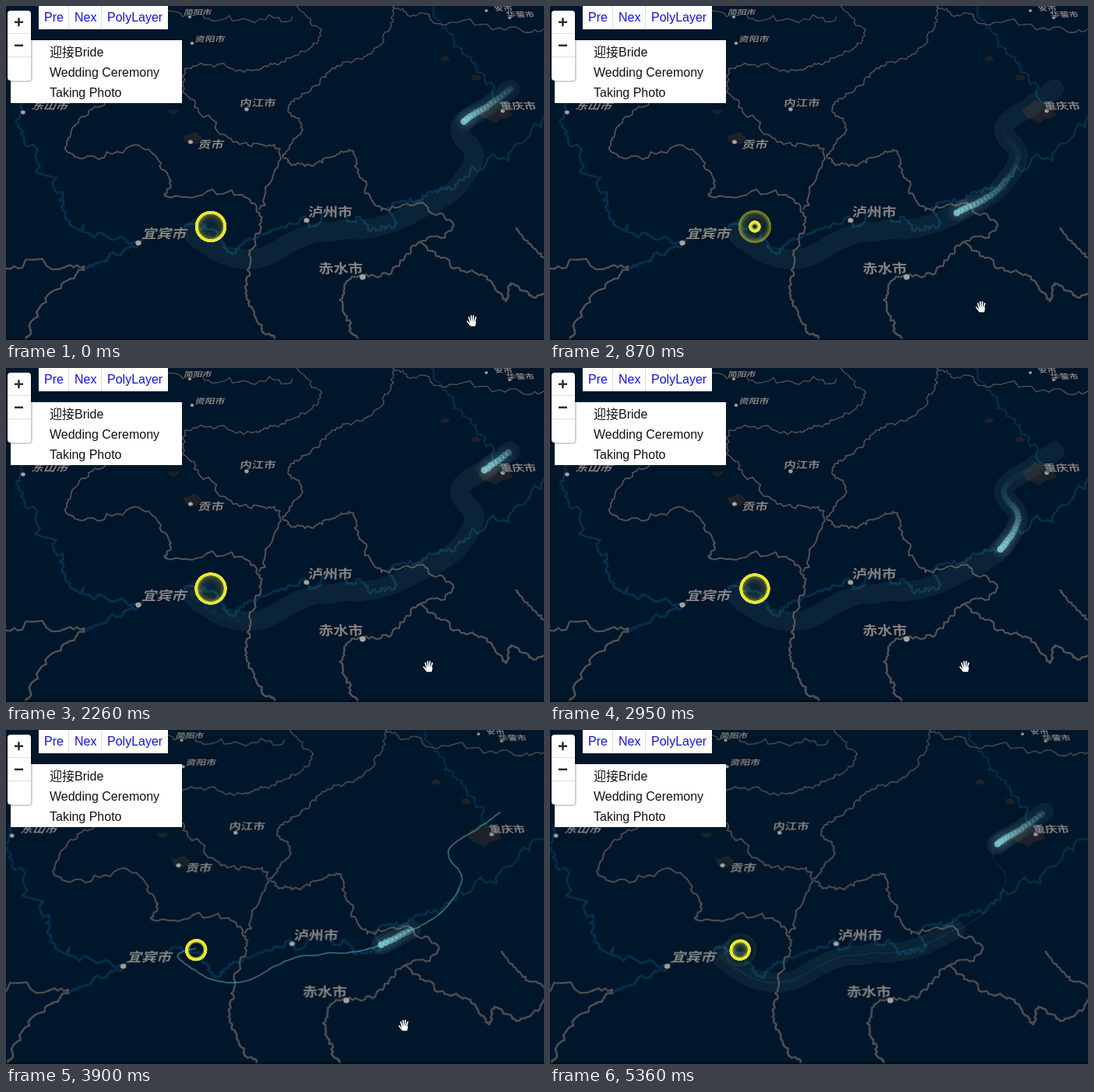
Write an HTML page with a canvas that moves like this. It is 691 px wide and 430 px high and loops after 5.43 s.

```html
<!DOCTYPE html>
<html lang="zh">
<head>
<meta charset="utf-8">
<title>Route map</title>
<style>
  html, body { margin: 0; width: 100%; height: 100%; overflow: hidden; background: #00162b; }
  canvas { display: block; }
</style>
</head>
<body>
<canvas id="stage" width="691" height="430"></canvas>
<script>
const W = 691, H = 430, LOOP = 5430;
const TRIP = 2410, RIPPLE = 745;
const DRAG_START = 3080, RESTART = 3720;
const SANS = '"Liberation Sans", Arial, "Noto Sans CJK SC", "Noto Sans CJK", sans-serif';
const CJK = '"Noto Sans CJK SC", "Noto Sans CJK", sans-serif';
const ctx = document.getElementById('stage').getContext('2d');

const clamp = (v, a, b) => Math.min(b, Math.max(a, v));
const mod = (v, n) => ((v % n) + n) % n;
const easeOut = u => 1 - (1 - clamp(u, 0, 1)) ** 2;
const parsePoints = text => text.split(' ').map(p => p.split(',').map(Number));

/* ---------- Lines ---------- */

let seed = 11;
const random = () => (seed = (seed * 16807) % 2147483647) / 2147483647 - 0.5;

// Catmull-Rom curve through the key points.
function curve(keys, steps) {
  const out = [keys[0]];
  for (let i = 1; i < keys.length; i++) {
    const b = keys[i - 1], c = keys[i], a = keys[i - 2] || b, d = keys[i + 1] || c;
    for (let n = 1; n <= steps; n++) {
      const u = n / steps;
      out.push([0, 1].map(k => b[k] + 0.5 * u * (c[k] - a[k]
        + u * (2 * a[k] - 5 * b[k] + 4 * c[k] - d[k] + u * (3 * (b[k] - c[k]) + d[k] - a[k])))));
    }
  }
  return out;
}

// Midpoint displacement turns a smooth curve into a natural border or river.
function roughen(list, amount, depth) {
  if (!depth) return list;
  const out = [list[0]];
  for (let i = 1; i < list.length; i++) {
    const [ax, ay] = list[i - 1], [bx, by] = list[i];
    const d = random() * amount;
    out.push([(ax + bx) / 2 + (by - ay) * d, (ay + by) / 2 - (bx - ax) * d], [bx, by]);
  }
  return roughen(out, amount, depth - 1);
}

/* ---------- Map ---------- */

const RIVERS = [
  '22,125 19,165 62,235 88,285 170,304',
  '170,305 130,325 100,340',
  '170,304 195,292 262,288 290,318 315,300 388,276 450,272 470,288 500,282 495,258 548,240 580,228 650,185 716,132',
  '545,0 575,45 605,80 640,135'
];

const BORDERS = [
  '497,0 495,25 470,60 425,77 385,112 363,132 380,157 357,196 395,206 440,185 457,222 482,263 528,254 575,283 528,306',
  '452,430 434,395 440,353 495,344 528,306 570,332 618,352 642,380 648,357 681,375 716,346',
  '716,334 678,312 655,286',
  '128,124 84,160 88,194 175,183 212,225 208,246 300,243 328,278 310,340 312,386 345,430',
  '372,0 404,38 345,74 310,82 230,80 242,130 300,178 352,184 325,262',
  '208,5 275,18 368,14',
  '497,0 545,17 660,30 716,28',
  '0,338 100,335 62,366 25,430'
];

const URBAN = [[630, 135, 26, 15], [240, 170, 14, 8], [215, 136, 7, 3.5], [564, 68, 6, 4], [603, 92, 7, 4]];

// name, dot x, dot y, label offset x, label offset y
const CITIES = [
  ['简阳市', 236, 14, -8, -3], ['资阳市', 239, 48, 3, -2], ['内江市', 309, 133, -9, -4],
  ['东山市', 22, 137, 10, -4], ['贡市', 237, 175, 9, 8], ['宜宾市', 170, 305, 4, -6],
  ['泸州市', 386, 276, 2, -5], ['赤水市', 458, 349, -56, -5], ['重庆市', 638, 135, -2, -2],
  ['安市', 617, 6, 11, 0], ['华蓥市', 647, 15, -3, -1]
];

function drawMap() {
  const canvas = document.createElement('canvas');
  canvas.width = W + 25;
  canvas.height = H + 5;
  const c = canvas.getContext('2d');
  c.fillStyle = '#00162b';
  c.fillRect(0, 0, canvas.width, canvas.height);
  c.lineCap = c.lineJoin = 'round';

  c.fillStyle = '#1d2229';
  for (const [x, y, rx, ry] of URBAN) {
    c.beginPath();
    for (let a = 0; a < 6.28; a += 0.4) {
      const size = 0.9 + random() * 0.5;
      c.lineTo(x + rx * size * Math.cos(a), y + ry * size * Math.sin(a));
    }
    c.fill();
  }

  const strokeLines = (lines, colour, amount, width) => {
    c.strokeStyle = colour;
    for (const text of lines) {
      const list = roughen(curve(parsePoints(text), 4), amount, 2);
      for (let i = 1; i < list.length; i++) {
        c.lineWidth = width(list[i][1]);
        c.beginPath();
        c.moveTo(...list[i - 1]);
        c.lineTo(...list[i]);
        c.stroke();
      }
    }
  };
  strokeLines(RIVERS, '#04304d', 1, y => 1.8 + y / 240);
  strokeLines(BORDERS, '#545253', 0.7, y => 1.2 + y / 330);

  for (const [name, x, y, dx, dy] of CITIES) {
    c.fillStyle = '#a5a29c';
    c.beginPath();
    c.ellipse(x, y, 2 + y / 180, 1.8 + y / 220, 0, 0, 7);
    c.fill();
    // Perspective leans and flattens the lettering.
    c.save();
    c.transform(1, 0, (x - 400) * 0.0011, 0.72 + y * 0.0005, x + dx, y + dy);
    c.font = `bold ${Math.min(19, 11.5 + y * 0.029)}px ${CJK}`;
    c.fillStyle = '#858585';
    c.shadowColor = '#000a16';
    c.shadowBlur = 2;
    c.fillText(name, 0, 0);
    c.restore();
  }
  return canvas;
}
const map = drawMap();

/* ---------- Route ---------- */

const ROUTE = roughen(curve(parsePoints(
  '648,107 621,127 587,150 585,167 602,193 578,234 531,262 479,284 390,294 337,321 307,326 275,318 239,292 262,282'
), 5), 0.2, 1);
const reached = [0];
for (let i = 1; i < ROUTE.length; i++) {
  reached.push(reached[i - 1] + Math.hypot(ROUTE[i][0] - ROUTE[i - 1][0], ROUTE[i][1] - ROUTE[i - 1][1]));
}
const total = reached[ROUTE.length - 1];

function routePoint(s) {
  const i = Math.max(1, reached.findIndex(r => r >= s));
  const u = (s - reached[i - 1]) / (reached[i] - reached[i - 1]);
  return ROUTE[i].map((v, k) => ROUTE[i - 1][k] + (v - ROUTE[i - 1][k]) * u);
}

// The traveller slows in the middle of the trip and speeds up towards its end.
const travelled = trip => Math.min(total, trip * (0.195 + 5e-8 * (trip - 900) ** 2));
const tripTime = t => mod(t < DRAG_START ? t + 350 : t - 2600, TRIP);

function strokeRoute(from, to, width, colour) {
  ctx.beginPath();
  for (let s = from; s < to; s += 2) ctx.lineTo(...routePoint(s));
  ctx.lineTo(...routePoint(to));
  ctx.lineWidth = width;
  ctx.strokeStyle = colour;
  ctx.stroke();
}

function drawResidue(t) {
  const band = (from, to) => strokeRoute(from, to, 25, 'rgba(125,160,160,.09)');
  if (t < DRAG_START) return band(0, total);
  const first = travelled(tripTime(RESTART)), now = travelled(tripTime(t));
  const wrapped = tripTime(t) < tripTime(RESTART);
  band(first, wrapped ? total : now);
  if (wrapped) band(0, now);
}

function drawTrail(t, started) {
  const step = 25, newest = Math.floor(t / step) * step;
  ctx.save();
  ctx.fillStyle = '#7ad0d6';
  ctx.shadowColor = 'rgba(200,220,225,.6)';
  ctx.shadowBlur = 13;
  for (let age = 800; age >= 0; age -= step) {
    const emitted = newest - age;
    if (emitted < started) continue;
    // Before the drag the earlier loop of the same trip is still fading.
    const s = travelled(mod(tripTime(t) - (t - emitted), TRIP));
    if (s >= total) continue;
    ctx.globalAlpha = 0.85 * Math.exp(-age / 190);
    ctx.beginPath();
    ctx.arc(...routePoint(s), 4.4, 0, 7);
    ctx.fill();
  }
  ctx.restore();
}

function drawRipple(t, started) {
  const x = 263, y = 284, inner = 4, outer = 19, half = 2;
  const phase = mod((t < DRAG_START ? t + 715 : t - 3490) / RIPPLE, 1);
  const radius = inner + (outer - inner) * phase;
  const edge = outer + half + 0.5;
  const gradient = ctx.createRadialGradient(x, y, 0, x, y, edge);
  // Each radius fades from the moment the ring last crossed it.
  for (let r = 0; r <= edge; r += 0.5) {
    const crossed = clamp((r - inner) / (outer - inner), 0, 1);
    const near = Math.abs(r - radius) <= half;
    const age = near ? 0 : mod(phase - crossed, 1) * RIPPLE;
    const covered = r > inner - half && r < edge - 0.4 && (near || age <= t - started);
    const alpha = covered ? (near ? 0.95 : 0.8 * Math.exp(-age / 165)) : 0;
    gradient.addColorStop(r / edge, `rgba(246,244,48,${alpha})`);
  }
  ctx.fillStyle = gradient;
  ctx.beginPath();
  ctx.arc(x, y, edge, 0, 7);
  ctx.fill();
}

/* ---------- Interface ---------- */

function drawInterface() {
  const text = (s, x, y, colour) => {
    ctx.fillStyle = colour;
    ctx.fillText(s, x, y);
  };
  const box = (x, y, w, h, colour, radius = 0) => {
    ctx.fillStyle = colour;
    ctx.beginPath();
    ctx.roundRect(x, y, w, h, radius);
    ctx.fill();
  };
  ctx.font = `16px ${SANS}`;
  box(6, 44, 220, 81, '#fff');
  ['迎接Bride', 'Wedding Ceremony', 'Taking Photo'].forEach((s, i) => text(s, 56, 65 + 26 * i, '#111'));

  // Each button is its label with the same padding, plus a divider.
  box(42, 0, 166, 30, '#fff');
  let x = 42;
  for (const label of ['Pre', 'Nex', 'PolyLayer']) {
    if (x > 42) box(x - 1, 0, 1, 30, '#ddd');
    text(label, x + 7, 20, '#1414cf');
    x += Math.round(ctx.measureText(label).width) + 14;
  }

  box(1, 5, 33, 93, 'rgba(0,0,0,.18)', 5);
  box(2, 6, 30, 90, '#fff', 4);
  box(2, 35, 30, 1, '#ddd');
  box(2, 65, 30, 1, '#ddd');
  box(11, 19.5, 11, 2.5, '#2d2d2d');
  box(15.2, 15.2, 2.5, 11, '#2d2d2d');
  box(11, 49.5, 11, 2.5, '#2d2d2d');
}

// start, duration, dx, dy
const CURSOR_MOVES = [
  [100, 500, -45, -18], [1300, 420, -11, -3], [2490, 540, -10, 0],
  [DRAG_START, RESTART - DRAG_START, -21.5, -4], [4850, 400, 0, 80]
];

function drawCursor(t) {
  let x = 599, y = 406;
  for (const [start, duration, dx, dy] of CURSOR_MOVES) {
    const u = easeOut((t - start) / duration);
    x += dx * u;
    y += dy * u;
  }
  const closed = t >= DRAG_START && t < RESTART;
  const hand = new Path2D();
  for (let i = -1.5; i <= 1.5; i++) {
    hand.moveTo(i * 1.6, 2);
    hand.lineTo(i * (closed ? 2.2 : 3), (closed ? -3.5 : -7.5) + i * i);
  }
  hand.moveTo(closed ? -4.5 : -6.5, 0);
  hand.lineTo(-2, 5.5);
  hand.lineTo(3, 5.5);
  hand.lineTo(4, 1);
  ctx.save();
  ctx.translate(x, y);
  ctx.lineWidth = 3.4;
  ctx.strokeStyle = '#05101c';
  ctx.stroke(hand);
  ctx.lineWidth = closed ? 2.2 : 1.7;
  ctx.strokeStyle = ctx.fillStyle = closed ? '#d2dcde' : '#fff';
  ctx.fillRect(-3, 0, 6, 5);
  ctx.stroke(hand);
  ctx.restore();
}

/* ---------- Frame ---------- */

function draw(t) {
  const drag = easeOut((t - DRAG_START) / (RESTART - DRAG_START));
  const dragging = t >= DRAG_START && t < RESTART;
  const started = t < DRAG_START ? -Infinity : RESTART;

  ctx.lineCap = ctx.lineJoin = 'round';
  ctx.save();
  // Panning shifts the near ground further than the horizon.
  ctx.transform(1, 0, -0.031 * drag, 1, -10 * drag, -0.8 * drag);
  ctx.drawImage(map, 0, 0);
  if (t >= DRAG_START) {
    const alpha = dragging ? 0.9 : 0.08 + 0.75 * Math.exp((RESTART - t) / 300);
    strokeRoute(0, total, 1.8, `rgba(105,192,196,${alpha})`);
  }
  if (!dragging) {
    drawResidue(t);
    drawTrail(t, started);
    drawRipple(t, started);
  }
  ctx.restore();

  ctx.fillStyle = 'rgba(0,6,16,.6)';
  ctx.fillRect(0, 428, W, 2);
  drawCursor(t);
  drawInterface();
}

const begin = performance.now();
function tick() {
  draw((performance.now() - begin) % LOOP);
  requestAnimationFrame(tick);
}
tick();
</script>
</body>
</html>
```
